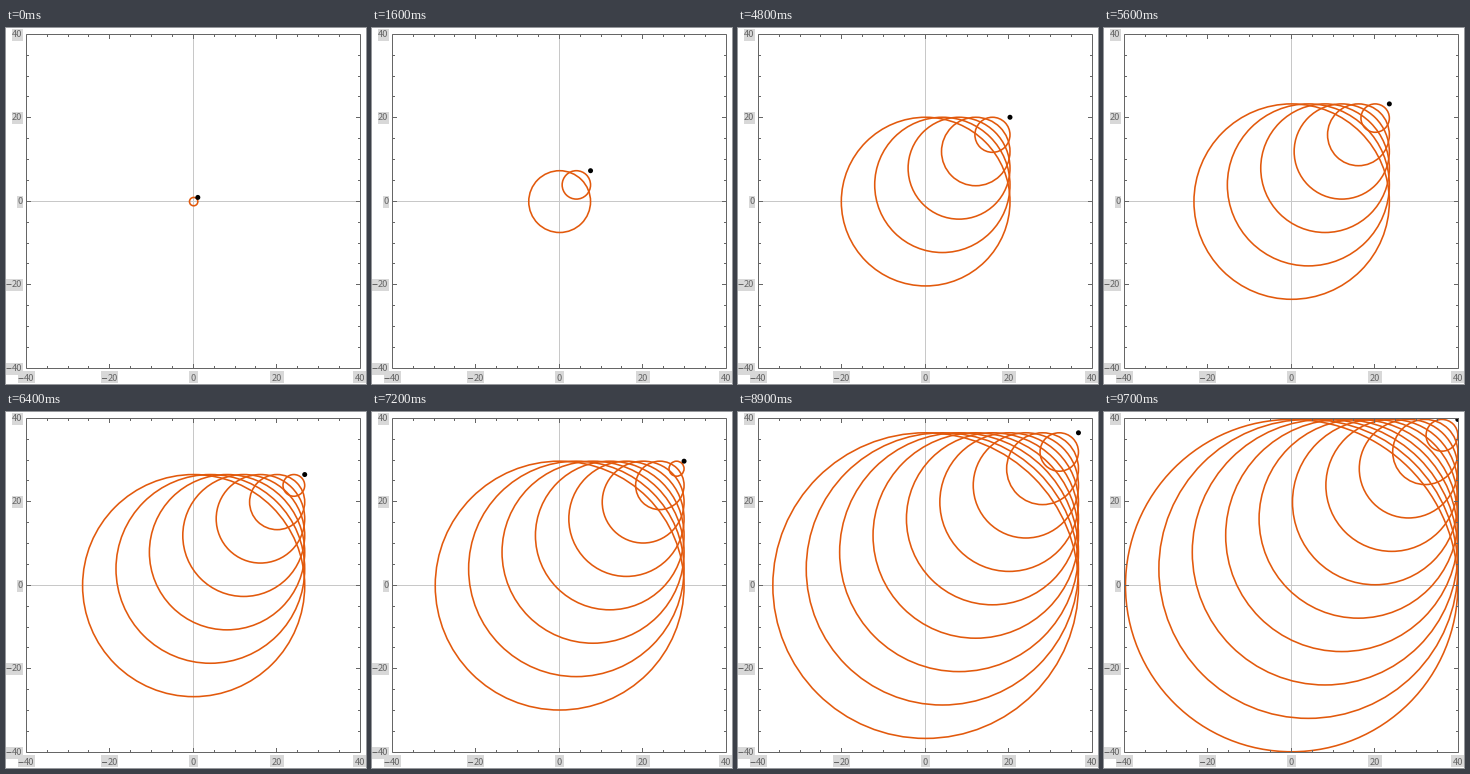
Write a matplotlib script that moves like this. It is 360x356 px and loops after 9.8 s.

```python
import math

import matplotlib.pyplot as plt
from matplotlib.animation import FuncAnimation
from matplotlib.patches import Circle, Rectangle

plt.rcParams["path.snap"] = False  # lines are placed on pixel centres by hand

W, H, DPI = 360, 356, 100
PX = 72 / DPI                      # points per pixel
LEFT, TOP, SIDE = 20.5, 6.5, 334
RIGHT, BOTTOM = LEFT + SIDE, TOP + SIDE
UNIT = SIDE / 80                   # pixels per axis unit
ORIGIN_X, ORIGIN_Y = 187.65, 173.6
FRAMES, STEP, EVERY = 98, 0.4, 10  # a new circle starts every EVERY frames
ORANGE, INK, AXIS, LABEL_BG = "#e2590c", "#666666", "#c8c8c8", "#d8d8d8"


def to_x(v):
    return ORIGIN_X + v * UNIT


def to_y(v):
    return ORIGIN_Y - v * UNIT


def pixel(pos):
    return math.floor(pos - 0.3)


fig = plt.figure(figsize=(W / DPI, H / DPI), dpi=DPI, facecolor="white")
ax = fig.add_axes([0, 0, 1, 1])
ax.set_xlim(0, W)
ax.set_ylim(H, 0)
ax.axis("off")


def line(xs, ys, color=INK, z=6):
    ax.plot(xs, ys, color=color, lw=PX, zorder=z, solid_capstyle="butt")


def label(v, right, baseline, box):
    left, top, width, height = box
    ax.add_patch(Rectangle((left, top), width, height, fc=LABEL_BG, lw=0, zorder=1))
    ax.text(right, baseline, str(abs(v)), ha="right", va="baseline",
            family="Noto Sans CJK JP", size=9.3 * PX, color=INK, zorder=7)
    if v < 0:
        y = math.floor(baseline) - 2.5
        line([right - 16, right - 11], [y, y], z=7)


def draw_axes():
    line([187.5] * 2, [TOP, BOTTOM], AXIS, 2)
    line([LEFT, RIGHT], [173.5] * 2, AXIS, 2)
    ax.add_patch(Rectangle((LEFT, TOP), SIDE, SIDE, fill=False, ec=INK, lw=PX, zorder=6))
    for v in range(-35, 40, 5):
        size = 4.5 if v % 20 == 0 else 2.5
        x, y = pixel(to_x(v)) + 0.5, pixel(to_y(v)) + 0.5
        line([x, x], [TOP, TOP + size])
        line([x, x], [BOTTOM, BOTTOM - size])
        line([LEFT, LEFT + size], [y, y])
        line([RIGHT, RIGHT - size], [y, y])
    for v in range(-40, 41, 20):
        width = 17 if v < 0 else 11 if v else 6
        row = pixel(to_y(v))
        label(v, 16.5, row + 3, (17 - width, row - 5, width, 12))
        col = to_x(v) - 0.6
        wide = width + (0 if v < 0 else 3)
        label(v, col + width / 2, 353, (round(col - wide / 2), 343, wide, 12))


draw_axes()
clip = Rectangle((LEFT - 0.5, TOP - 0.5), SIDE + 1, SIDE + 1,
                 transform=ax.transData)
circles = []
for n in range((FRAMES - 1) // EVERY + 1):
    ring = Circle((to_x(4 * n), to_y(4 * n)), 1, fill=False, ec=ORANGE,
                  lw=1.6 * PX, zorder=4)
    circles.append(ax.add_patch(ring))
dot = ax.add_patch(Circle((0, 0), 2.5, fc="black", lw=0, zorder=5))
for shape in circles + [dot]:
    shape.set_clip_path(clip)


def update(k):
    for n, ring in enumerate(circles):
        age = k - EVERY * n
        ring.set_visible(age >= 0)
        ring.set_radius(max(0, 1 + STEP * age) * UNIT)
    p = 1 + STEP * k
    dot.center = (to_x(p), to_y(p))
    return circles + [dot]


anim = FuncAnimation(fig, update, frames=FRAMES, interval=100,
                     repeat=True, repeat_delay=0, blit=False)
plt.show()
```
